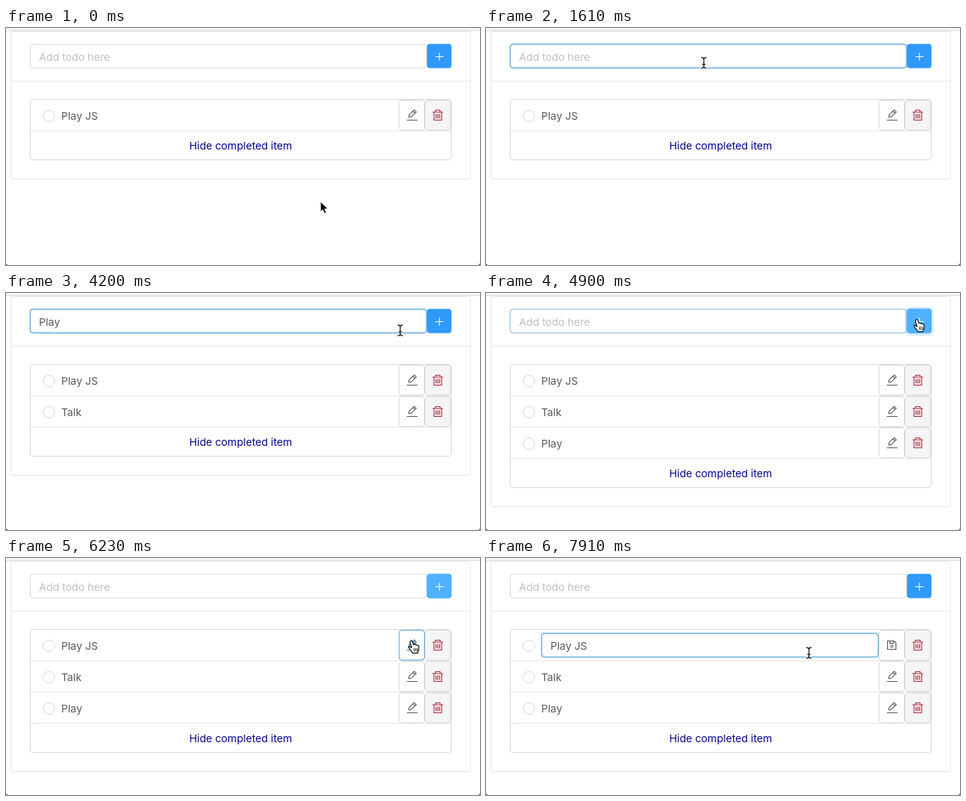
Animation of 618x310 px, one loop 8000 ms. Source, as an HTML page:

```html
<!DOCTYPE html>
<html lang="en">
<head>
<meta charset="utf-8">
<title>Todo list</title>
<style>
  html, body { margin: 0; height: 100%; overflow: hidden; background: #fff; }
  svg { display: block; width: 618px; height: 310px; }
  text { font: 13.75px Inter, Roboto, sans-serif; fill: #595959; white-space: pre; }
  path, circle { fill: none; stroke-linejoin: round; stroke-linecap: round; }
</style>
</head>
<body>
<svg id="stage" viewBox="0 0 618 310"></svg>
<script>
const LOOP = 8000;
const GREY = '#d9d9d9', BLUE = '#62abdb', INK = '#595959', RED = '#ac3045';
const ADD_TALK = 2660, ADD_PLAY = 4760, EDIT = 6720, EDIT_FOCUS = 7200;

// Typed words: the time of each key press and the time the field is emptied
const words = [
  { text: 'Talk', keys: [1680, 2100, 2240, 2310], end: ADD_TALK },
  { text: 'Play', keys: [3080, 3220, 3360, 3500], end: ADD_PLAY }
];

// Pointer path: time, x, y, shape
const path = [
  [0, 410, 227, 'arrow'], [70, 410, 227, 'arrow'], [490, 292, 55, 'arrow'],
  [500, 291, 52, 'beam'], [770, 284, 46, 'beam'], [1610, 284, 45.5, 'beam'],
  [1680, 284, 45.5, ''], [3640, 284, 45.5, 'beam'], [4130, 514, 48.8, 'beam'],
  [4410, 514, 48.8, 'beam'], [4520, 549, 45, 'hand'], [4690, 565, 41, 'hand'],
  [5040, 563, 42, 'hand'], [5250, 549, 63, 'hand'], [5600, 532, 114, 'hand'],
  [6580, 530, 116, 'hand'], [6720, 528, 115, 'hand'], [6770, 508, 113, 'beam'],
  [6860, 420, 108, 'beam'], [7100, 420, 114, 'beam'], [7490, 420, 124, 'beam'],
  [7910, 421, 124, 'beam'], [LOOP, 421, 124, 'beam']
];

const ruler = document.createElement('canvas').getContext('2d');
const textWidth = s => {
  ruler.font = '13.75px Inter, Roboto, sans-serif';
  return ruler.measureText(s).width;
};
const ramp = (t, from, length) => Math.max(0, Math.min(1, (t - from) / length));
const ease = p => p * p * (3 - 2 * p);
// 0..1 strength of a state that fades in at a and out at b
const fade = (t, a, b, length = 260) => ease(ramp(t, a, length)) * (1 - ease(ramp(t, b, length)));

const rect = (x, y, w, h, r, stroke, fill = 'none', extra = '') =>
  `<rect x="${x}" y="${y}" width="${w}" height="${h}" rx="${r}" stroke="${stroke}" fill="${fill}" ${extra}/>`;
const line = (d, stroke, width = 1) => `<path d="${d}" stroke="${stroke}" stroke-width="${width}"/>`;
const text = (x, y, s, style = '') => `<text x="${x}" y="${y}" style="${style}">${s}</text>`;
const at = (x, y, s) => `<g transform="translate(${x} ${y})">${s}</g>`;
const caret = (x, y) => line(`M${x} ${y - 8}V${y + 8}`, '#333');

const field = (x, y, w, focus) =>
  rect(x, y, w, 31, 3.5, GREY, '#fff') +
  rect(x, y, w, 31, 3.5, '#1890ff', 'none', `stroke-width="4" stroke-opacity="${0.12 * focus}"`) +
  rect(x, y, w, 31, 3.5, BLUE, 'none', `stroke-opacity="${focus}"`);

// Ring that spreads from a clicked button
function wave(t, start, x, y, w, h) {
  const p = ramp(t, start, 420);
  if (p <= 0 || p >= 1) return '';
  const s = 5 * Math.sqrt(p);
  return rect(x - s / 2, y - s / 2, w + s, h + s, 4 + s / 2, '#1890ff', 'none',
    `stroke-width="${s}" stroke-opacity="${0.25 * (1 - p)}"`);
}

const pencil = c =>
  line('M-6 6.5H7', c, 1.2) +
  line('M-4 2.8L-3.4 -0.3L3.2 -6.9L5.9 -4.2L-0.8 2.3ZM1.5 -5.2L4.2 -2.5', c, 1.1);
const disk = c =>
  line('M-5.5 -5.5H2.8L5.5 -2.8V5.5H-5.5ZM-2.5 -5.5V-2.4H2V-5.5', c, 1.1) +
  `<circle cy="1.5" r="1.6" stroke="${c}"/>`;
const trash = line('M-6.5 -4H6.5M-3 -4V-6.5H3V-4M-5 -4V6.5H5V-4M-2.3 -1.3V4M0 -1.3V4M2.3 -1.3V4', RED, 1.15);

const pointers = {
  arrow: '<path d="M0 0V13.5L3 10.8L5.2 15.6L7.7 14.5L5.5 9.8H9.6Z" style="fill:#000" stroke="#fff"/>',
  beam: ['#fff', '#111'].map((c, i) =>
    line('M-3 -7Q0 -7 0 -4.8Q0 -7 3 -7M0 -4.8V4.8M-3 7Q0 7 0 4.8Q0 7 3 7M-1.7 2H1.7',
      c, i ? 1.25 : 2.8)).join(''),
  hand: '<path d="M-3.5 -6.3Q-2 -8 -0.8 -6L0.6 -2Q2 -3.4 3 -1.7Q4.5 -2.7 5.3 -1Q7.4 -1.6 7.5 1' +
    'L7.3 5L6 9H-0.5L-4.8 3.2Q-6.8 0.4 -4.4 0.4L-1.8 2.3L-3.9 -4Z" style="fill:#fff" stroke="#111" stroke-width="1.2"/>' +
    line('M1.4 3V6.5M3.4 3V6.5M5.4 3V6.5', '#111', 0.9)
};

function pointer(t) {
  const i = path.findIndex((k, n) => n + 1 === path.length || t < path[n + 1][0]);
  const a = path[i], b = path[Math.min(i + 1, path.length - 1)];
  if (!a[3]) return '';
  const p = ramp(t, a[0], b[0] - a[0] || 1);
  return at(a[1] + (b[1] - a[1]) * p, a[2] + (b[2] - a[2]) * p, pointers[a[3]]);
}

function newTodo(t) {
  const word = words.find(w => t >= w.keys[0] && t < w.end);
  const typed = word ? word.text.slice(0, word.keys.filter(k => t >= k).length) : '';
  const lastKey = Math.max(620, ...words.flatMap(w => [...w.keys, w.end]).filter(k => k <= t));
  const blink = t >= 620 && t < ADD_PLAY && (t - lastKey) % 1000 < 500;
  const hover = fade(t, 4480, EDIT, 120);
  return field(31.5, 21.2, 516.8, fade(t, 600, ADD_PLAY)) +
    (typed ? text(43, 42.7, typed) : text(43, 42.7, 'Add todo here', 'fill:#bfbfbf')) +
    (blink ? caret(43.5 + textWidth(typed), 38) : '') +
    wave(t, ADD_PLAY, 549, 21, 32, 32) +
    rect(548.8, 20.8, 32, 31.7, 4, 'none', '#2f99fc') +
    rect(548.8, 20.8, 32, 31.7, 4, 'none', '#4fb1ff', `opacity="${hover}"`) +
    line('M560 37.5H570M565 32.5V42.5', '#fff');
}

function row(t, label, i) {
  const y = 94 + 41 * i, editing = i === 0 && t >= EDIT;
  const active = i === 0 ? fade(t, 5530, EDIT_FOCUS, 200) : 0;
  const icon = editing ? disk : pencil;
  let s = line(`M32 ${y + 40.5}H580`, '#e8e8e8') +
    `<circle cx="56" cy="${y + 21}" r="7.5" stroke="${GREY}"/>`;
  if (editing) {
    s += field(72.5, y + 4.5, 439, fade(t, EDIT_FOCUS, LOOP + 1)) + text(84, y + 26, label);
    if (t >= EDIT_FOCUS && t < EDIT_FOCUS + 500) s += caret(84.5 + textWidth(label), y + 21);
  } else {
    s += text(72, y + 26, label);
  }
  return s +
    rect(546.5, y + 0.5, 33, 39, 3.5, GREY, '#f5f5f5') + at(563, y + 20, trash) +
    (i === 0 ? wave(t, EDIT, 512.5, y + 0.5, 33, 39) : '') +
    rect(512.5, y + 0.5, 33, 39, 3.5, GREY, '#fff') +
    rect(512.5, y + 0.5, 33, 39, 3.5, BLUE, 'none', `stroke-opacity="${active}"`) +
    at(529, y + 20, icon(INK) + `<g opacity="${active}">${icon('#3a92d0')}</g>`);
}

function scene(t) {
  const items = ['Play JS'];
  if (t >= ADD_TALK) items.push('Talk');
  if (t >= ADD_PLAY) items.push('Play');
  const foot = 94 + 41 * items.length;
  return rect(0, 0, 618, 3, 0, 'none', '#f5f5f5') + line('M0 3.5H618', '#dedede') +
    rect(6.5, 4.5, 599, foot + 58, 2, '#e8e8e8') + line('M7 69.5H605', '#e8e8e8') +
    newTodo(t) +
    rect(31.5, 93.5, 549, foot - 56, 3.5, GREY) +
    items.map((label, i) => row(t, label, i)).join('') +
    text(306, foot + 24, 'Hide completed item', 'fill:#050591;text-anchor:middle') +
    '<path d="M0 308V310H2ZM618 308V310H616Z" style="fill:#555"/>' +
    pointer(t);
}

const stage = document.getElementById('stage');
function draw(now) {
  stage.innerHTML = scene(now % LOOP);
  requestAnimationFrame(draw);
}
draw(performance.now());
</script>
</body>
</html>
```
